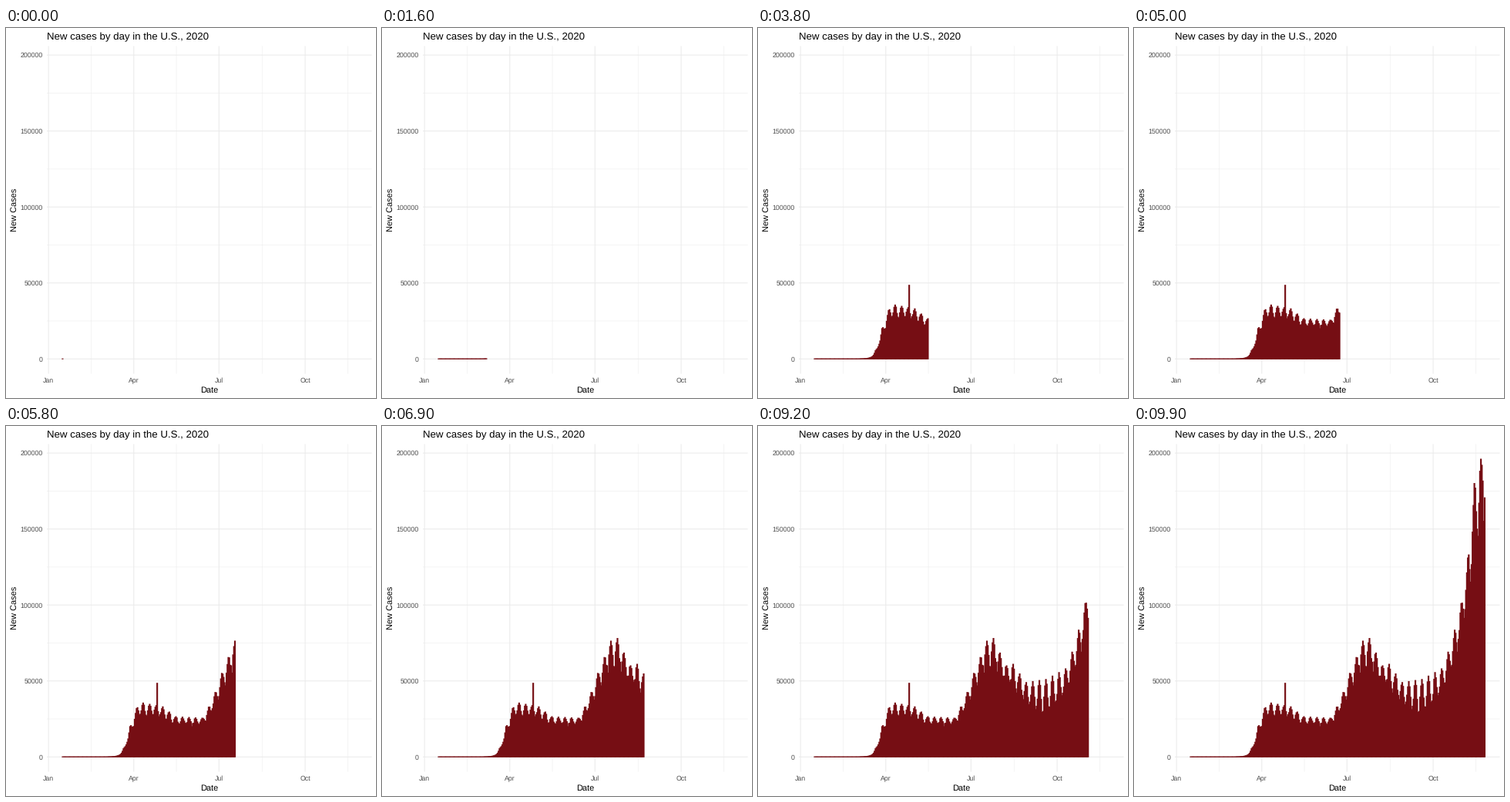
Animation of 480 by 480 pixels, one loop 10 s. Source, as a matplotlib script:

```python
import matplotlib.pyplot as plt
import numpy as np
from matplotlib.animation import FuncAnimation
from matplotlib.collections import PolyCollection

SIZE, DPI = 480, 72  # at 72 dpi one point is one pixel
FRAMES, INTERVAL = 100, 100
LEFT, RIGHT, TOP, BOTTOM = 53.0, 474.5, 23.5, 448.5
FIRST, LAST = 15, 329  # days since 1 January
SATURDAY, BACKLOG_DAY = 3, 116
RED, GRID, GREY = "#760e14", "#ebebeb", "#4d4d4d"

# Key points of the weekly peak: day, thousands of cases.
PEAKS = [
    (60, 0.05), (73, 0.6), (80, 5.4), (87, 20), (95, 34), (101, 35.5),
    (122, 33), (136, 26.5), (164, 25.5), (172, 34), (185, 55), (198, 76),
    (206, 78), (220, 60), (227, 61), (241, 49), (262, 51), (283, 58),
    (290, 69), (304, 101), (311, 131), (318, 180), (325, 196), (329, 206),
]

plt.rcParams["font.family"] = "Liberation Sans"
plt.rcParams["text.hinting"] = "none"


def px(day):
    return 55.2 + 1.215 * day


def py(cases):
    return 429.3 - 0.001971 * cases


def daily_cases(days):
    """Peak curve, lowered between Saturdays, most strongly in September."""
    keys, peaks = np.transpose(PEAKS)
    peak = 1000 * np.exp(np.interp(days, keys, np.log(peaks)))
    dip = 0.2 + 0.2 * np.exp(-(((days - 262) / 25) ** 2))
    week = 0.5 - 0.5 * np.cos(2 * np.pi * (days - SATURDAY) / 7)
    noise = np.random.default_rng(4).uniform(-0.05, 0.05, len(days))
    cases = peak * (1 - dip * week + noise * week)
    cases[days == BACKLOG_DAY] = 48500
    return cases


def bar(day, cases):
    line = 1.07 / 2
    half = 0.45 * 1.215 + line
    x, top, base = px(day), py(cases) - line, py(0) + line
    return [(x - half, base), (x - half, top), (x + half, top), (x + half, base)]


def rule(xs, ys, width):
    ax.plot(xs, ys, color=GRID, lw=width, snap=False, solid_capstyle="butt")


def label(x, y, text, size, color="black", **kw):
    ax.text(x, y, text, fontsize=size, color=color, **kw)


fig = plt.figure(figsize=(SIZE / DPI, SIZE / DPI), dpi=DPI, facecolor="white")
ax = fig.add_axes([0, 0, 1, 1])
ax.set(xlim=(0, SIZE), ylim=(SIZE, 0))
ax.axis("off")

MONTHS = {"Jan": 0, "Apr": 91, "Jul": 182, "Oct": 274}
LEVELS = range(0, 200001, 50000)

for day in (45.5, 136.5, 228, 319.5):
    rule([px(day)] * 2, [TOP, BOTTOM], 0.53)
for level in LEVELS[:-1]:
    rule([LEFT, RIGHT], [py(level + 25000)] * 2, 0.53)
for name, day in MONTHS.items():
    rule([px(day)] * 2, [TOP, BOTTOM], 1.07)
    label(px(day), 460, name, 8.8, GREY, ha="center")
for level in LEVELS:
    rule([LEFT, RIGHT], [py(level)] * 2, 1.07)
    label(48, py(level) + 3.3, str(level), 8.8, GREY, ha="right")

label(52.8, 15, "New cases by day in the U.S., 2020", 13.2)
label(263.5, 473, "Date", 11, ha="center")
label(16.2, 236, "New Cases", 11, ha="right", va="center", rotation=90)

days = np.arange(FIRST, LAST + 1)
bars = [bar(d, c) for d, c in zip(days, daily_cases(days))]
columns = PolyCollection([], facecolors=RED, edgecolors="none", linewidths=0, zorder=3)
columns.set_snap(False)
ax.add_collection(columns, autolim=False)


def draw(frame):
    shown = int(np.ceil((LAST - FIRST) * frame / (FRAMES - 1))) + 1
    columns.set_verts(bars[:shown])
    return [columns]


anim = FuncAnimation(fig, draw, frames=FRAMES, interval=INTERVAL, repeat=True, repeat_delay=0)
plt.show()
```
